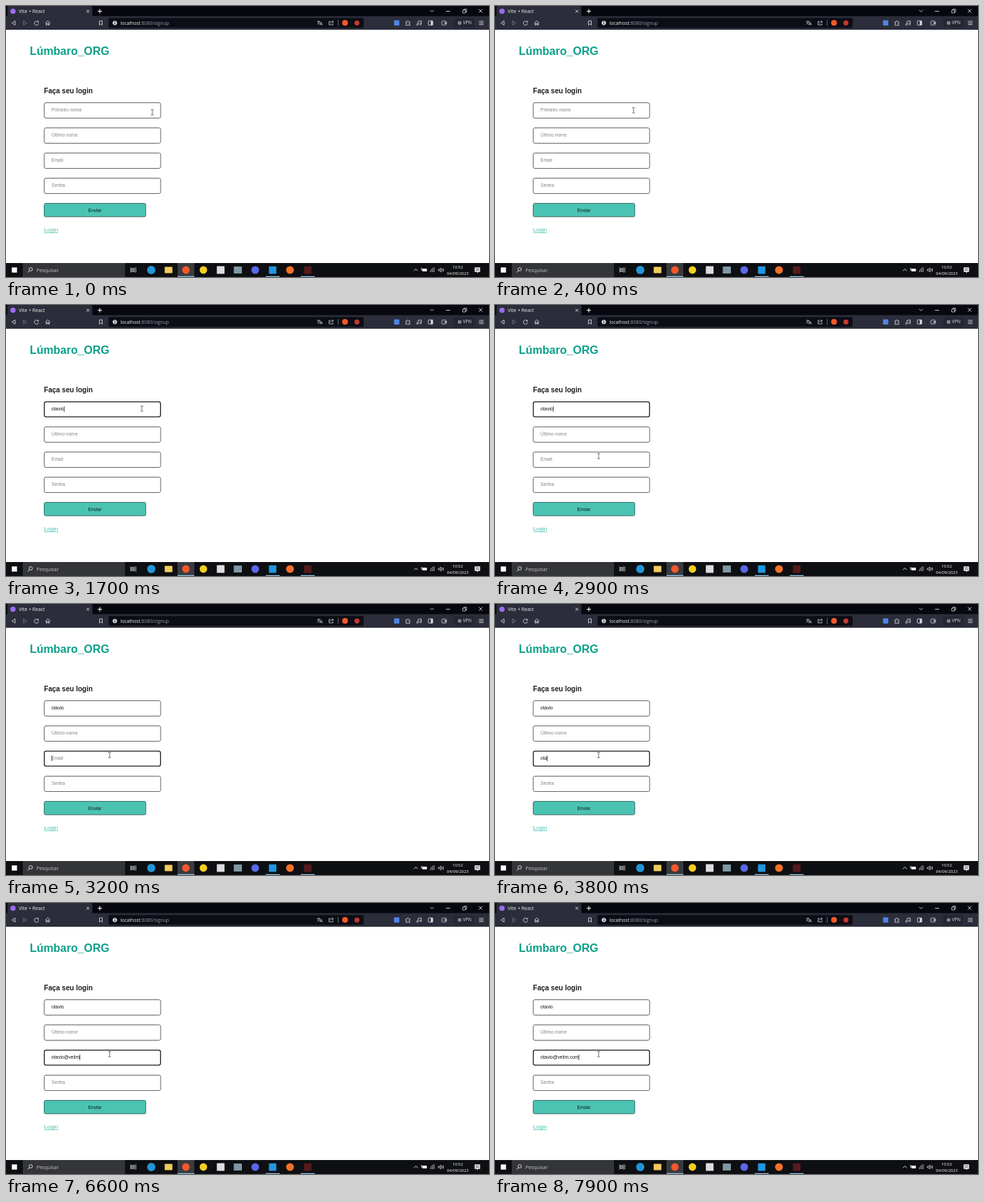
An HTML page with a canvas that plays this animation: 690 by 388 pixels, repeating every 8000 ms.

```html
<!DOCTYPE html>
<html lang="pt-BR">
<head>
<meta charset="utf-8">
<title>Signup</title>
<style>
html, body { margin: 0; width: 100%; height: 100%; overflow: hidden; background: #fff; }
canvas { display: block; width: 690px; height: 388px; }
</style>
</head>
<body>
<canvas id="stage"></canvas>
<script>
const W = 690, H = 388, LOOP = 8000, TICK = 100, BLINK = 530;
const ARIAL = '"Liberation Sans", Arial, sans-serif';
const UI = '"Open Sans", "Noto Sans", sans-serif';
const canvas = document.getElementById('stage');
const dpr = window.devicePixelRatio || 1;
canvas.width = W * dpr;
canvas.height = H * dpr;
const ctx = canvas.getContext('2d');

// Key times in ms; one per character.
const fields = [
  { y: 138, hint: 'Primeiro nome', text: 'otavio', focus: 700, blur: 3100,
    keys: [900, 1000, 1200, 1500, 1680, 1690] },
  { y: 174, hint: 'Último nome' },
  { y: 210, hint: 'Email', text: 'otavio@velim.com', focus: 3100, blur: LOOP,
    keys: [3500, 3600, 3800, 4200, 4300, 4350, 5290, 6000, 6100, 6200, 6400, 6560, 7300, 7600, 7700, 7800] },
  { y: 246, hint: 'Senha' }
];
const moves = [
  { from: 0, to: 600, a: [209, 152], b: [194, 148] },
  { from: 2500, to: 2900, a: [194, 148], b: [148, 216] }
];

function rect(x, y, w, h, color) {
  ctx.fillStyle = color;
  ctx.fillRect(x, y, w, h);
}
function round(x, y, w, h, r, fill, stroke, lw = 1) {
  ctx.beginPath();
  ctx.roundRect(x, y, w, h, r);
  if (fill) { ctx.fillStyle = fill; ctx.fill(); }
  if (stroke) { ctx.strokeStyle = stroke; ctx.lineWidth = lw; ctx.stroke(); }
}
function dot(x, y, r, fill, stroke, lw = 0.8) {
  ctx.beginPath();
  ctx.arc(x, y, r, 0, 7);
  if (fill) { ctx.fillStyle = fill; ctx.fill(); }
  if (stroke) { ctx.strokeStyle = stroke; ctx.lineWidth = lw; ctx.stroke(); }
}
function path(d, color, lw = 0.9, x = 0, y = 0) {
  ctx.save();
  ctx.translate(x, y);
  ctx.strokeStyle = color;
  ctx.lineWidth = lw;
  ctx.stroke(new Path2D(d));
  ctx.restore();
}
function text(s, x, y, size, color, family = ARIAL, weight = 400, align = 'left') {
  ctx.font = `${weight} ${size}px ${family}`;
  ctx.textAlign = align;
  ctx.fillStyle = color;
  ctx.fillText(s, x, y);
}

function drawBrowser() {
  const ink = '#d4d5dc';
  rect(0, 0, W, 15, '#07080f');
  rect(0, 14.5, W, 19.5, '#2b2d3a');
  round(2, 0, 121.5, 16, [3, 3, 0, 0], '#2b2d3a');
  dot(10, 7.5, 3.8, '#9a6cf0');
  text('Vite + React', 18.2, 9.8, 6.9, '#f0f0f4', UI);
  path('M-2-2L2 2M2-2L-2 2', '#e4e4ea', 0.9, 117, 7.5);
  path('M-3 0H3M0-3V3', '#fff', 1.1, 134, 7.5);
  path('M-2.5-1.2L0 1.3L2.5-1.2', ink, 0.9, 608.5, 7);
  path('M-3 0H3', ink, 0.9, 631.5, 7.5);
  path('M-2.5-1H1.5V3H-2.5ZM-1-1V-2.5H3V1.5H1.5', ink, 0.8, 655, 7);
  path('M-2.5-2.5L2.5 2.5M2.5-2.5L-2.5 2.5', ink, 0.9, 678, 7);

  path('M2-3V3L-2.5 0Z', ink, 0.9, 11, 24.3);
  path('M-2-3V3L2.5 0Z', '#777986', 0.9, 27, 24.3);
  path('M2.4-1.6A3 3 0 1 0 3 .6M2.8-3V-1.2H.9', ink, 0.9, 43.5, 24.3);
  path('M-3.2 0L0-3L3.2 0M-2.3-.6V3H-.8V.8H.8V3H2.3V-.6', ink, 0.9, 59.7, 24.2);
  path('M-2-3H2V3L0 1.2L-2 3Z', ink, 0.9, 135.5, 24.3);

  round(146.5, 17.3, 364.5, 14, 2, '#0c0d15');
  dot(155.5, 24.3, 3.1, '#d4d5dc');
  rect(155.1, 22.3, 0.9, 0.9, '#0c0d15');
  rect(155.1, 23.8, 0.9, 2.4, '#0c0d15');
  text('localhost', 163.5, 26.7, 6.8, '#f2f2f5', UI);
  const host = ctx.measureText('localhost').width;
  text(':8080/signup', 163.5 + host, 26.7, 6.8, '#9a9ba6', UI);
  path('M-3.5-2H1M-1.2-3V-2M.4-2C-.4 0-2 1.5-3.4 2M-2.6-1C-2 .4-.8 1.2 0 1.4M.4 3.2L2.2-1L4 3.2M1 1.9H3.4', ink, 0.8, 448, 24.2);
  path('M-.8-2H-3V3H2.6V.8M-1 1C-.8-.7.3-1.5 3-1.5M1.4-3.1L3.1-1.5L1.4 0', ink, 0.8, 464.5, 24);
  rect(474, 20, 0.9, 8.5, '#6a6b76');
  dot(484.3, 24.2, 4.1, '#f4582b');
  dot(501.3, 24.3, 3.6, '#c8382f');

  round(554.3, 20.5, 7.6, 7.6, 1, '#5084e6');
  path('M-3-1.7H-1C-1.5-3.6 1.5-3.6 1-1.7H2.8V.1C.8-.3.8 1.9 2.8 1.5V3.2H-3V1.4C-1.2 1.8-1.2-.4-3 0Z', ink, 0.8, 574.2, 24.4);
  path('M-1.5 2V-2.2L3-3V1.2', ink, 0.9, 590.2, 24.3);
  dot(587.7, 26.5, 1.2, null, ink);
  dot(592.2, 25.7, 1.2, null, ink);
  round(603.3, 21.3, 6.4, 6, 0.8, null, ink, 0.9);
  rect(606.8, 21.3, 2.9, 6, ink);
  round(622.6, 21.6, 6.4, 5.5, 1, null, ink, 0.8);
  rect(626.3, 23.5, 3.2, 1.8, ink);
  round(640, 17.8, 29, 12.8, 2, '#242632');
  dot(648, 24.2, 2.5, '#aeb0ba');
  path('M-2.5 0H2.5M0-2.5V2.5', '#242632', 0.5, 648, 24.2);
  text('VPN', 652.8, 26.4, 6.2, '#e2e3e8', UI);
  path('M-3.3-2.3H3.3M-3.3 0H3.3M-3.3 2.3H3.3', ink, 0.9, 679, 24.3);
}

function drawTaskbar() {
  rect(0, 368, W, 20, '#0e0f12');
  rect(24, 368, 146, 20, '#343538');
  round(8.3, 374.3, 7.4, 7.4, 0, '#fff');
  dot(35.3, 377, 2.4, null, '#e8e8e8', 0.9);
  path('M33.6 378.8L31 381.5', '#e8e8e8', 1);
  text('Pesquisar', 43.8, 380.5, 6.9, '#c6c6c8', UI);

  path('M-3.5-3.5V-2H2V-3.5M-3.5 3.5V2H2V3.5M-3.5-1H2V1H-3.5ZM4-3.5V3.5', '#e4e4e4', 0.8, 181.5, 378);
  rect(245, 368, 24, 20, '#3a3b3e');
  for (const [x, w] of [[245, 24], [371, 20], [421, 20]]) rect(x, 386.8, w, 1.2, '#8fc3ea');
  dot(207.5, 378, 5.9, '#2295d6');
  round(226.7, 373.5, 11, 9, 0.8, '#f3cb5c');
  dot(257, 378, 5.4, '#f4582b');
  dot(282, 378, 5.4, '#f5cf1e');
  round(301.2, 372.6, 11, 11, 0.5, '#dcdcdc');
  round(325.4, 373, 11.6, 10, 0.5, '#7f98a4');
  dot(356, 378, 5.5, '#5b68ea');
  round(375.6, 372.8, 10.6, 10.6, 1, '#2196e0');
  dot(405.7, 378, 5.6, '#f4702a');
  round(425.6, 372.8, 10.8, 10.6, 0.5, '#571a1c');

  const ink = '#ececec';
  path('M-2.7 1.3L0-1.4L2.7 1.3', ink, 0.9, 585.5, 378);
  round(594.8, 376, 6.5, 4, 0.4, ink);
  path('M-3.6-2V2', ink, 1.1, 597.5, 377);
  path('M-3 3A6 6 0 0 1 3-3M-.8 3A3.8 3.8 0 0 1 3-.8M1.3 3A1.7 1.7 0 0 1 3 1.3', ink, 0.8, 609.5, 378);
  path('M-4-1H-2.5L-.5-2.8V2.8L-2.5 1H-4ZM1-1.3Q2 0 1 1.3M2.4-2.5Q4.2 0 2.4 2.5', ink, 0.8, 621.8, 378);
  text('10:52', 645.3, 375.6, 5.9, '#fff', UI, 400, 'center');
  text('04/09/2023', 645.3, 384.6, 5.9, '#fff', UI, 400, 'center');
  ctx.fillStyle = ink;
  ctx.fill(new Path2D('M669.5 374.3H677.3V380.7H674.8L673 382.7V380.7H669.5Z'));
  path('M671 376.3H675.8M671 378.4H675.8', '#0e0f12', 0.6);
}

function drawField(f, t) {
  const on = f.keys && t >= f.focus && t < f.blur;
  const typed = f.keys ? f.keys.filter(k => k <= t) : [];
  const value = typed.length ? f.text.slice(0, typed.length) : '';
  if (on) round(54.7, f.y + 0.6, 166, 21.6, 2.6, '#fff', '#1c1c1c', 1.3);
  else round(54.6, f.y + 0.5, 166.3, 22, 2.4, '#fff', '#555', 0.9);
  text(value || f.hint, 65, f.y + 13.4, 6.67, value ? '#161616' : '#858585');
  if (!on) return;
  const since = t - Math.max(f.focus, ...typed);
  if (Math.floor(since / BLINK) % 2) return;
  const x = 65 + (value ? ctx.measureText(value).width : 0);
  rect(x, f.y + 7, 0.8, 8, '#222');
}

function drawPage(t) {
  rect(0, 34, W, 334, '#fff');
  text('Lúmbaro_ORG', 34, 69.5, 16, '#0aa18a', ARIAL, 700);
  text('Faça seu login', 54.3, 125.3, 10, '#1c1c1c', ARIAL, 700);
  fields.forEach(f => drawField(f, t));
  round(54.6, 282.6, 145.1, 19.2, 2.2, '#4bc3b3', '#2f5f58', 0.9);
  text('Enviar', 127, 294.6, 6.67, '#101c1a', ARIAL, 400, 'center');
  text('Login', 54.4, 323.3, 8.1, '#44bfae');
  rect(54.4, 324.3, 20, 0.8, '#44bfae');
}

function drawPointer(t) {
  const m = t < moves[1].from ? moves[0] : moves[1];
  const p = Math.min(1, Math.max(0, (t - m.from) / (m.to - m.from)));
  const e = p * p * (3 - 2 * p);
  const [x, y] = m.a.map((v, i) => v + (m.b[i] - v) * e);
  path('M-2-3.7H-.5L0-3.3L.5-3.7H2M0-3.3V3.3M-2 3.7H-.5L0 3.3L.5 3.7H2', '#484848', 0.8, x, y + 0.3);
}

function frame(now) {
  const t = Math.floor((now % LOOP) / TICK) * TICK;
  ctx.setTransform(dpr, 0, 0, dpr, 0, 0);
  drawPage(t);
  drawBrowser();
  drawTaskbar();
  drawPointer(t);
}

const start = performance.now();
function loop() {
  frame(performance.now() - start);
  requestAnimationFrame(loop);
}
loop();
</script>
</body>
</html>
```
